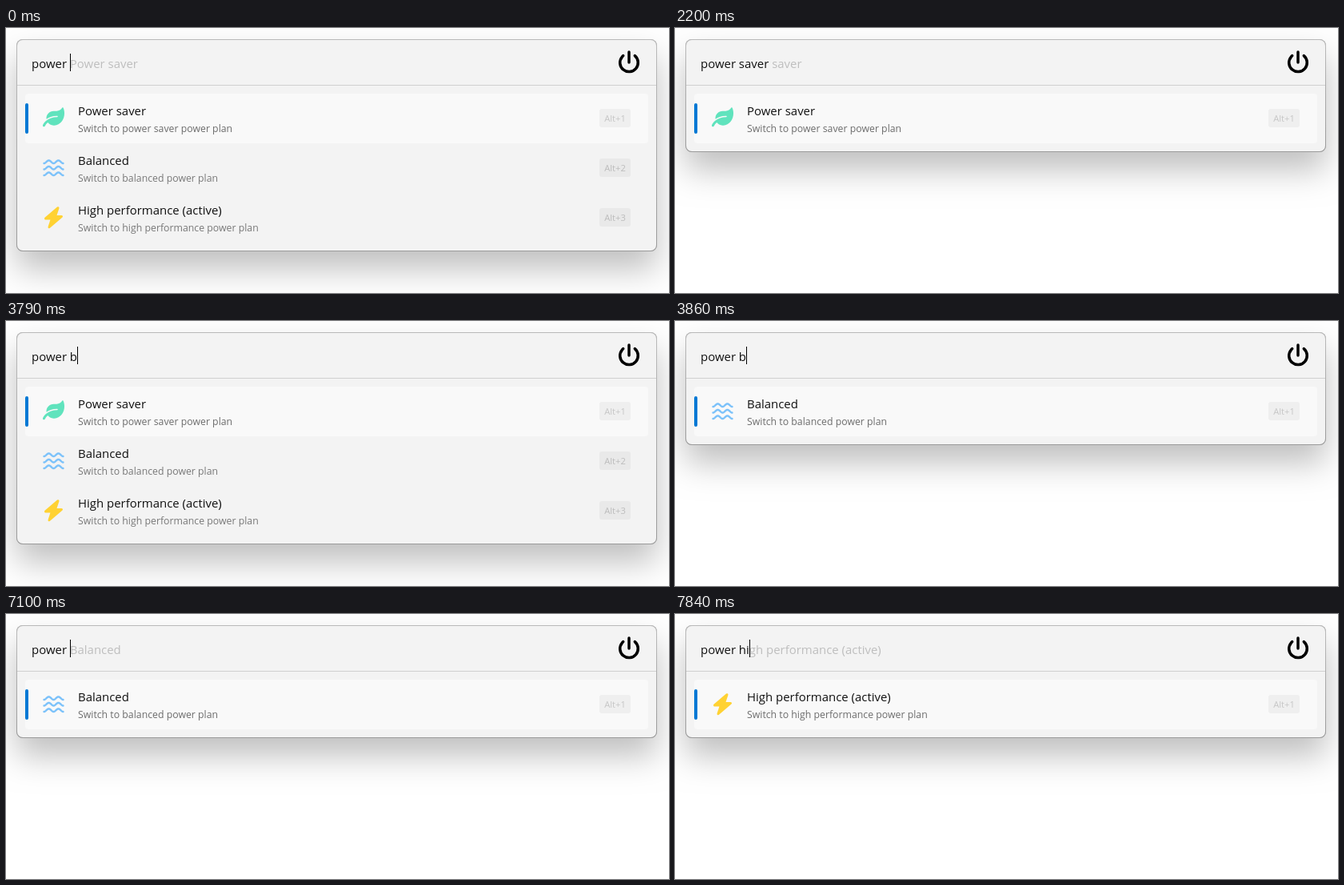
Recreate the animation shown at these times as an HTML page with a canvas. Size 829x331 px, loop 8 s.

```html
<!DOCTYPE html>
<html lang="en">
<head>
<meta charset="utf-8">
<title>Power plan launcher</title>
<style>
  html, body { margin: 0; width: 100%; height: 100%; overflow: hidden; background: #fff; }
  canvas { display: block; }
</style>
</head>
<body>
<canvas id="stage" width="829" height="331"></canvas>
<script>
const ctx = document.getElementById('stage').getContext('2d', { alpha: false });
const LOOP = 8000;
const FONT = '"Open Sans", "Noto Sans", sans-serif';
const MAIN = `14.95px ${FONT}`;
const SMALL = `12.3px ${FONT}`;
const KEY = `11.2px ${FONT}`;

const SAVER = 0, BALANCED = 1, HIGH = 2;
const ALL = [SAVER, BALANCED, HIGH];
const plans = [
  { title: 'Power saver', sub: 'Switch to power saver power plan', icon: leaf },
  { title: 'Balanced', sub: 'Switch to balanced power plan', icon: waves },
  { title: 'High performance (active)', sub: 'Switch to high performance power plan', icon: bolt }
];

// Every event changes only the fields it names.
const events = [];
let last = {};
function at(time, change) {
  last = { ...last, ...change };
  events.push({ time, ...last });
}

function edit(word, firstLength, step, times) {
  times.forEach((time, i) => at(time, { typed: word.slice(0, firstLength + i * step), caret: true }));
}

at(0, { typed: '', rows: ALL, hint: SAVER, caret: true });
at(530, { caret: false });
at(860, { typed: 's', hint: null, caret: true });
at(930, { rows: [SAVER] });
at(1060, { typed: 'sa', hint: SAVER });
edit('saver', 3, 1, [1270, 1460, 1590]);
at(2200, { caret: false });
edit('saver', 4, -1, [2330, 2530, 2660, 2790]);
at(3120, { typed: '', hint: null });
at(3190, { hint: SAVER });
at(3260, { rows: ALL });
at(3660, { caret: false });
at(3790, { typed: 'b', hint: null, caret: true });
at(3860, { rows: [BALANCED] });
at(3990, { typed: 'ba', hint: BALANCED });
edit('balanced', 3, 1, [4120, 4250, 4380, 4510, 4720, 4920]);
at(5450, { caret: false });
edit('balanced', 7, -1, [5780, 5980, 6110, 6310, 6510, 6640, 6840, 7100]);
at(7170, { rows: ALL });
at(7240, { hint: SAVER });
at(7640, { caret: false });
at(7710, { typed: 'h', hint: null, caret: true });
at(7770, { rows: [HIGH] });
at(7840, { typed: 'hi', hint: HIGH });

function box(x, y, w, h, r, color) {
  ctx.fillStyle = color;
  ctx.beginPath();
  ctx.roundRect(x, y, w, h, r);
  ctx.fill();
}

function text(str, x, y, font, color, align = 'left') {
  ctx.font = font;
  ctx.fillStyle = color;
  ctx.textAlign = align;
  ctx.fillText(str, x, y);
}

function pen(color, width) {
  ctx.strokeStyle = color;
  ctx.lineWidth = width;
  ctx.lineCap = ctx.lineJoin = 'round';
}

// Icons are drawn around their own centre.
const leafPath = new Path2D(`M546 10C540-3 525-3 518 8C487 62 431 96 368 96H288
  C182 96 96 182 96 288Q96 298 98 308C161 263 253 224 384 224
  A16 16 0 0 1 384 256C133 256 26 410 2 468A32 32 0 0 0 62 492
  Q82 444 134 402C166 446 228 487 308 479C466 468 576 327 576 154C576 104 565 52 546 10Z`);

function leaf() {
  ctx.scale(0.047, 0.047);
  ctx.translate(-288, -288);
  ctx.fillStyle = '#60e3bd';
  ctx.fill(leafPath);
}

function waves() {
  pen('#7cc2fa', 2.4);
  for (const y of [-7.5, 0, 7.5]) {
    ctx.beginPath();
    for (let x = -12; x <= 12; x += 0.5) {
      ctx.lineTo(x, y + 1.8 * Math.cos(x * Math.PI / 6));
    }
    ctx.stroke();
  }
}

function bolt() {
  pen('#ffd233', 3);
  ctx.fillStyle = '#ffd233';
  ctx.beginPath();
  for (const side of [1, -1]) {
    for (const [x, y] of [[5.5, -12], [-10, 1.3], [-2, 1.3]]) ctx.lineTo(x * side, y * side);
  }
  ctx.closePath();
  ctx.fill();
  ctx.stroke();
}

function powerButton() {
  const x = 779, y = 43.3, gap = 0.7;
  pen('#000', 3.5);
  ctx.beginPath();
  ctx.arc(x, y, 11.3, gap - Math.PI / 2, Math.PI * 1.5 - gap);
  ctx.moveTo(x, 30);
  ctx.lineTo(x, 43);
  ctx.stroke();
}

function panel(height) {
  ctx.save();
  ctx.shadowColor = 'rgba(0,0,0,.25)';
  ctx.shadowBlur = 40;
  ctx.shadowOffsetY = 22;
  box(13, 14, 801, height, 8, '#aaa');
  ctx.restore();
  const edge = ctx.createLinearGradient(0, 14, 0, 14 + height);
  edge.addColorStop(0, '#b9b9b9');
  edge.addColorStop(1, '#9a9a9a');
  box(13, 14, 801, height, 8, edge);
  box(14, 15, 799, height - 2, 7, '#f3f3f3');
  ctx.fillStyle = '#d0d0d0';
  ctx.fillRect(14, 71, 799, 1);
}

function row(plan, index) {
  const top = 82 + index * 62;
  const active = index === 0;
  if (active) {
    box(24, top, 779, 62, 4, '#f9f9f9');
    box(24, top + 12, 4, 38, 2, '#0078d4');
  }
  ctx.save();
  ctx.translate(59.5, top + 30.7);
  plan.icon();
  ctx.restore();
  text(plan.title, 90, top + 27, MAIN, '#111');
  text(plan.sub, 90, top + 48, SMALL, active ? '#6c6c6c' : '#787878');
  box(742, top + 19, 39, 23, 3, active ? '#efefef' : '#e9e9e9');
  text('Alt+' + (index + 1), 761.5, top + 35, KEY, active ? '#c6c6c6' : '#bcbcbc', 'center');
}

function query({ typed, hint, caret }) {
  const str = 'power ' + typed;
  text(str, 32, 50, MAIN, '#111');
  const end = 32 + ctx.measureText(str).width;
  if (hint !== null) text(plans[hint].title.slice(typed.length), end, 50, MAIN, '#bebebe');
  if (caret) {
    ctx.fillStyle = '#000';
    ctx.fillRect(Math.round(end), 32, 1, 22);
  }
}

function draw(now) {
  const time = now % LOOP;
  const state = events.findLast(e => e.time <= time);
  ctx.fillStyle = '#fff';
  ctx.fillRect(0, 0, 829, 331);
  panel(79 + state.rows.length * 62);
  query(state);
  powerButton();
  state.rows.forEach((id, i) => row(plans[id], i));
}

const start = performance.now();
function tick() {
  draw(performance.now() - start);
  requestAnimationFrame(tick);
}
tick();
</script>
</body>
</html>
```
